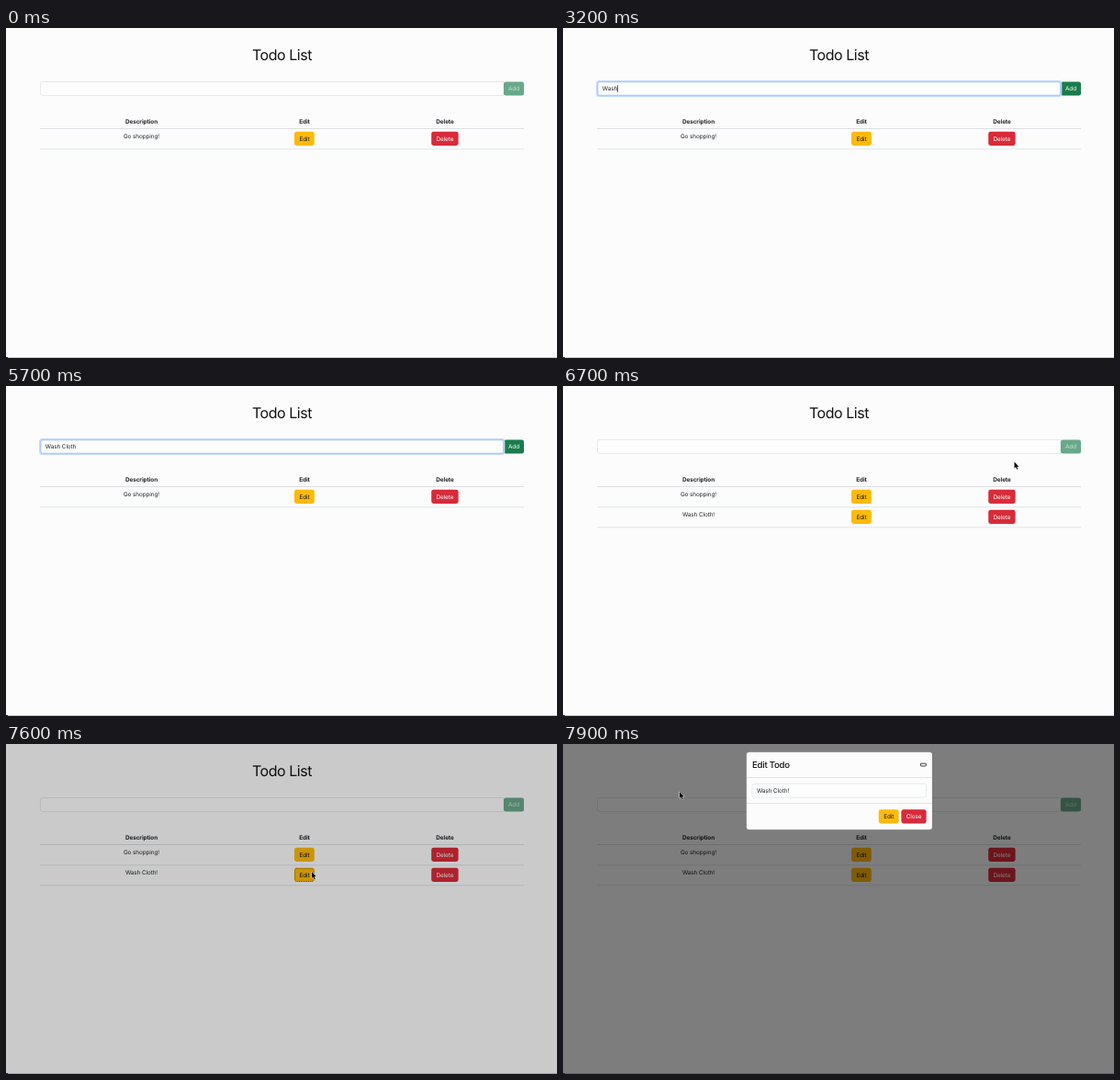
Animation, 600 px wide and 359 px high, one loop 8000 ms. Source, as an HTML page with a canvas:

```html
<!DOCTYPE html>
<html lang="en">
<head>
<meta charset="utf-8">
<title>Todo List</title>
<style>
  html, body { margin: 0; width: 100%; height: 100%; overflow: hidden; background: #fcfcfc; }
  canvas { display: block; width: 100vw; height: 100vh; }
</style>
</head>
<body>
<canvas id="stage"></canvas>
<script>
const W = 600, H = 359, LOOP = 8000, STEP = 100;
const canvas = document.getElementById('stage');
const ctx = canvas.getContext('2d');
const ratio = window.devicePixelRatio || 1;
canvas.width = W * ratio;
canvas.height = H * ratio;

const INK = '#212529', LINE = '#e1e4e7', YELLOW = '#ffba08', RED = '#d92b3a';
const TYPING = [[2200, 'W'], [2600, 'Wa'], [2800, 'Was'], [3000, 'Wash'], [3500, 'Wash '],
  [3800, 'Wash C'], [3900, 'Wash Cl'], [4000, 'Wash Clo'], [4100, 'Wash Cloth'], [5800, 'Wash Cloth!']];
const FOCUS = 800, BLUR = 6300, ADDED = 6400;

// Pointer tracks: [time, x, y]; the pointer is hidden while typing.
const TRACKS = [
  { until: 2200, points: [[400, 556, 66], [600, 330, 118], [800, 166, 68], [1100, 158.5, 64]] },
  { until: LOOP, points: [[5900, 158.5, 64], [6200, 548, 66], [6400, 553, 65], [6600, 553, 65],
    [6800, 430, 100], [7000, 190, 154], [7200, 240, 157], [7500, 333, 139], [7700, 333, 139], [7900, 127, 52]] }
];

const clamp = v => Math.max(0, Math.min(1, v));
const mix = (a, b, k) => a + (b - a) * k;

function text(str, x, y, { size = 6.4, weight = 400, color = INK, align = 'center', spacing = -0.1 } = {}) {
  ctx.font = `${weight} ${size}px Inter, sans-serif`;
  ctx.letterSpacing = spacing + 'px';
  ctx.textAlign = align;
  ctx.fillStyle = color;
  ctx.fillText(str, x, y);
  return ctx.measureText(str).width;
}

function box(x, y, w, h, r, fill, stroke, width = 1) {
  ctx.beginPath();
  ctx.roundRect(x, y, w, h, r);
  if (fill) { ctx.fillStyle = fill; ctx.fill(); }
  if (stroke) { ctx.strokeStyle = stroke; ctx.lineWidth = width; ctx.stroke(); }
}

function rule(x, y, w, color = LINE) {
  ctx.fillStyle = color;
  ctx.fillRect(x, y, w, 1);
}

function button(label, x, y, w, fill, color = '#fff') {
  box(x, y, w, 15.2, 2.4, fill);
  text(label, x + w / 2, y + 9.9, { color });
}

function pointerAt(t) {
  const track = TRACKS.find(k => t >= k.points[0][0] && t < k.until);
  if (!track) return null;
  const pts = track.points;
  const i = pts.findIndex(p => p[0] > t);
  if (i < 0) return pts[pts.length - 1].slice(1);
  const [a, b] = [pts[i - 1], pts[i]];
  const k = (t - a[0]) / (b[0] - a[0]);
  return [mix(a[1], b[1], k), mix(a[2], b[2], k)];
}

function drawPointer(x, y, hand) {
  const path = new Path2D(hand
    ? 'M1.6 4.6V.8Q2.3-.3 3 .8V3L5.3 3.4 6.8 4.1V6.4L6 8.6H2.3L-.3 5.3Q0 4 1.6 5Z'
    : 'M0 0V7L1.6 5.6 2.7 8.2 3.8 7.7 2.7 5.2H4.9Z');
  ctx.save();
  ctx.translate(x, y);
  ctx.lineJoin = 'round';
  ctx.lineWidth = 0.9;
  ctx.strokeStyle = hand ? '#111' : '#fff';
  ctx.fillStyle = hand ? '#fff' : '#000';
  ctx.stroke(path);
  ctx.fill(path);
  ctx.restore();
}

function drawInput(t) {
  const typed = t < ADDED ? TYPING.filter(k => k[0] <= t).pop() : null;
  const focus = t < BLUR ? clamp((t - FOCUS + 75) / 150) : 0;
  box(37.5, 58.5, 504.5, 15, [2.4, 0, 0, 2.4], '#fdfdfd', LINE, 0.8);
  const enabled = typed ? clamp((t - 2125) / 150) : 0;
  ctx.globalAlpha = mix(0.65, 1, enabled);
  button('Add', 542, 58.4, 22, t >= 6200 && t < ADDED ? '#157347' : '#197d4b');
  ctx.globalAlpha = focus;
  if (focus) {
    box(37.2, 58.2, 505, 15.6, 2.4, null, '#c2dafe', 2.2);
    box(37.8, 58.8, 503.8, 14.4, 2, '#fdfdfd', '#8fbafb', 0.8);
  }
  ctx.globalAlpha = 1;
  const width = typed ? text(typed[1], 42.8, 68.4, { align: 'left' }) : 0;
  const since = t - (typed ? typed[0] : FOCUS);
  if (focus && since % 1000 < 500) {
    ctx.fillStyle = '#222';
    ctx.fillRect(42.6 + width, 62.2, 0.8, 7.6);
  }
}

function drawRow(label, top, hover) {
  text(label, 147.5, top + 10.4);
  button('Edit', 314, top + 3, 21.8, hover ? '#ffc52a' : YELLOW, '#111');
  button('Delete', 463.2, top + 3, 29.4, RED);
  rule(37, top + 21.5, 527);
}

function drawModal(t) {
  const p = clamp((t - 7650) / 240);
  ctx.save();
  ctx.globalAlpha = clamp((t - 7650) / 150);
  ctx.translate(0, -20 * (1 - p) ** 2);
  box(199.7, 8.8, 202.4, 84.4, 3, '#fcfcfc', 'rgba(0,0,0,.25)', 0.5);
  text('Edit Todo', 206, 26, { size: 9.6, weight: 500, align: 'left', spacing: -0.25, color: '#111' });
  box(389.4, 21.2, 6, 2.8, 0.8, '#fff', '#222', 0.9);
  rule(200, 36, 202);
  box(206, 43.2, 189.6, 15, 2.4, '#fdfdfd', LINE, 0.8);
  text('Wash Cloth!', 211, 53, { align: 'left' });
  rule(200, 64, 202);
  button('Edit', 343.8, 71.2, 21.8, YELLOW, '#111');
  button('Close', 368.4, 71.2, 27.2, RED);
  ctx.restore();
}

function draw(t) {
  ctx.setTransform(ratio, 0, 0, ratio, 0, 0);
  ctx.textRendering = 'geometricPrecision';
  ctx.fillStyle = '#fcfcfc';
  ctx.fillRect(0, 0, W, H);
  rule(0, 358, W, '#c9c9c9');

  text('Todo List', 300.5, 35.3, { size: 16, weight: 400, color: '#111', spacing: -0.45 });
  drawInput(t);
  [['Description', 147.5], ['Edit', 325], ['Delete', 478]].forEach(([label, x]) =>
    text(label, x, 103.5, { weight: 700 }));
  rule(37, 109, 527, '#dcdfe2');

  const pointer = pointerAt(t);
  const over = (x, y, w) => pointer && pointer[0] >= x && pointer[0] <= x + w &&
    pointer[1] >= y && pointer[1] <= y + 15.2;
  const hoverFirst = over(314, 113, 21.8), hoverSecond = t >= ADDED && t < 7600 && over(314, 134.6, 21.8);
  drawRow('Go shopping!', 109.8, hoverFirst);
  if (t >= ADDED) drawRow('Wash Cloth!', 131.8, hoverSecond);
  if (t >= 7600 && t < 7800) {
    ctx.setLineDash([1, 1]);
    box(314.5, 135.3, 20.8, 14.2, 2, null, 'rgba(60,40,0,.6)', 0.9);
    ctx.setLineDash([]);
  }

  ctx.fillStyle = `rgba(0,0,0,${0.5 * clamp((t - 7540) / 150)})`;
  ctx.fillRect(0, 0, W, H);
  ctx.fillStyle = '#222';
  ctx.fillRect(0, 358, 2, 1);
  if (t > 7650) drawModal(t);

  const overAdd = t >= 6200 && t < ADDED;
  if (pointer) drawPointer(...pointer, overAdd || hoverFirst || hoverSecond);
}

function frame() {
  const t = performance.now() % LOOP;
  draw(Math.floor(t / STEP) * STEP);
  requestAnimationFrame(frame);
}
frame();
</script>
</body>
</html>
```
